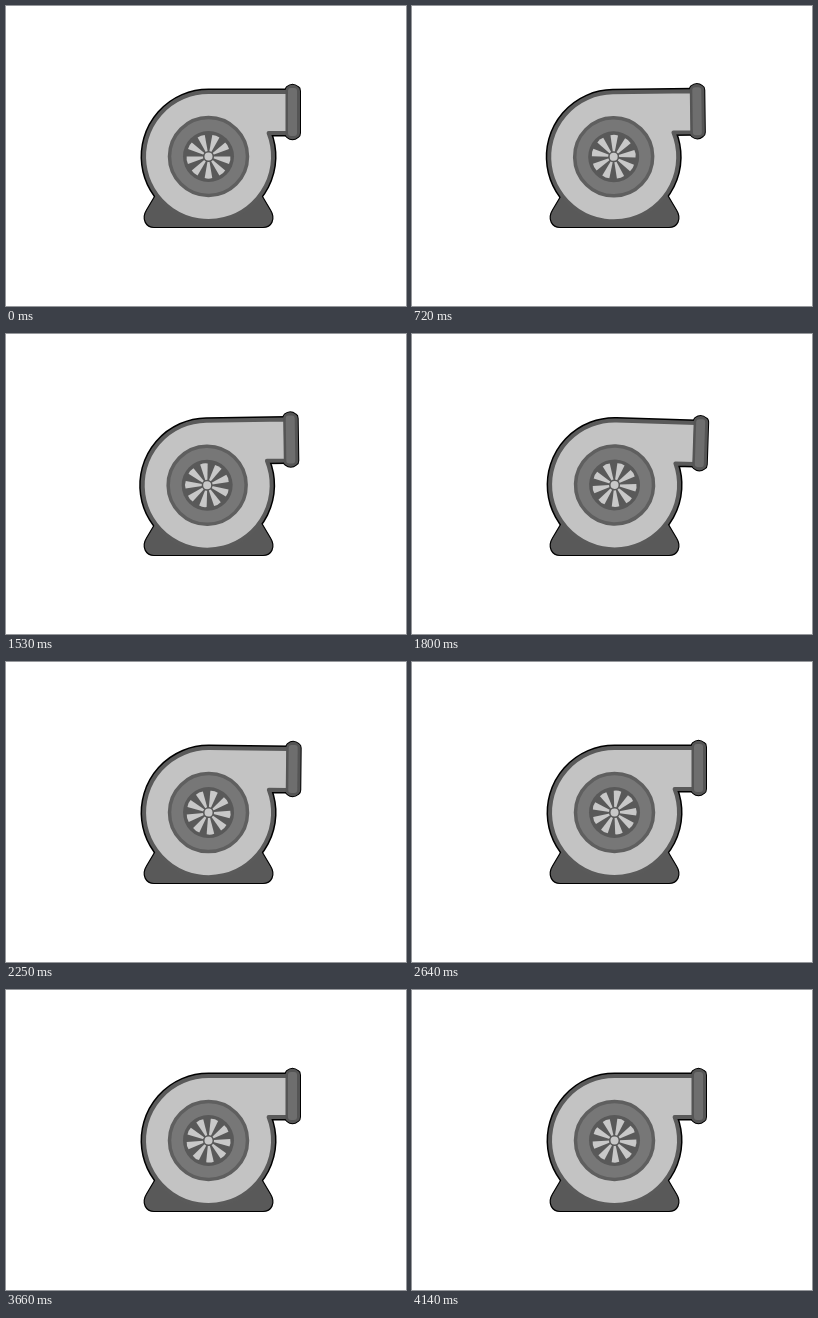
Write an HTML page that moves like this. It is 400 px wide and 300 px high and loops after 4170 ms.

```html
<!DOCTYPE html>
<html lang="en">
<head>
<meta charset="utf-8">
<title>Turbocharger</title>
<style>
html, body { margin: 0; width: 100%; height: 100%; overflow: hidden; background: #fff; }
svg { display: block; width: 400px; height: 300px; }
</style>
</head>
<body>
<svg viewBox="0 0 400 300" stroke-linejoin="round">
  <defs>
    <path id="shell" d="M202.5 86H282V127H262.6A64.5 64.5 0 1 1 202.5 86Z"/>
    <path id="flange" d="M279.500 84Q280 82 281 81Q286.5 76.5 292 81Q294 82 294 85V127Q294 130 292 131Q286.5 135.5 281 131Q279.500 130 279.500 128Z"/>
  </defs>

  <g class="body" stroke="#000">
    <use href="#shell" stroke-width="7"/>
    <use href="#flange" stroke-width="2"/>
  </g>

  <path d="M150 188L140.500 204C135 213 140 221.500 148 221.500H257C265.500 221.500 270 213 264.500 204L255 188Z" fill="#595959" stroke="#000" stroke-width="1.2"/>

  <g class="body">
    <use href="#shell" fill="#c3c3c3" stroke="#5a5a5a" stroke-width="4"/>
    <use href="#flange" fill="#555"/>
    <rect x="282" y="82" width="9" height="48" rx="3" fill="#6e6e6e"/>
    <g transform="translate(202.5 150.5)">
      <circle r="39" fill="#777" stroke="#5f5f5f" stroke-width="3.5"/>
      <circle r="25.5" fill="#595959"/>
      <g id="fan" fill="#c8c8c8"></g>
      <circle r="5.5" fill="#595959"/>
      <circle r="4" fill="#c8c8c8"/>
    </g>
  </g>
</svg>
<script>
const LOOP = 4170, BLADES = 9, CX = 202.5, CY = 150.5;
const fan = document.getElementById('fan');
const bodies = document.querySelectorAll('.body');

for (let i = 0; i < BLADES; i++) {
  fan.innerHTML += `<path d="M5 -1L21.5 -3.8Q22.8 0 21.5 3.8L5 1Z" transform="rotate(${10 + i * 360 / BLADES})"/>`;
}

// time, tilt in degrees, x, y
const keys = [
  [0, 0, 0, 0],
  [420, 0, 0, 0],
  [1100, -1.9, -2, 0.8],
  [1400, -1.5, -1.7, 0.8],
  [1850, 2, 0.1, 0.4],
  [2480, 0, 0, 0],
  [LOOP, 0, 0, 0]
];

function pose(t) {
  const n = keys.findIndex(k => k[0] > t);
  const a = keys[n - 1], b = keys[n];
  const u = (1 - Math.cos(Math.PI * (t - a[0]) / (b[0] - a[0]))) / 2;
  return a.map((v, i) => v + (b[i] - v) * u);
}

function draw() {
  const t = performance.now() % LOOP;
  const [, tilt, x, y] = pose(t);
  for (const body of bodies) {
    body.setAttribute('transform', `translate(${x} ${y}) rotate(${tilt} ${CX} ${CY})`);
  }
  fan.setAttribute('transform', `rotate(${360 * t / LOOP})`);
  requestAnimationFrame(draw);
}
draw();
</script>
</body>
</html>
```
